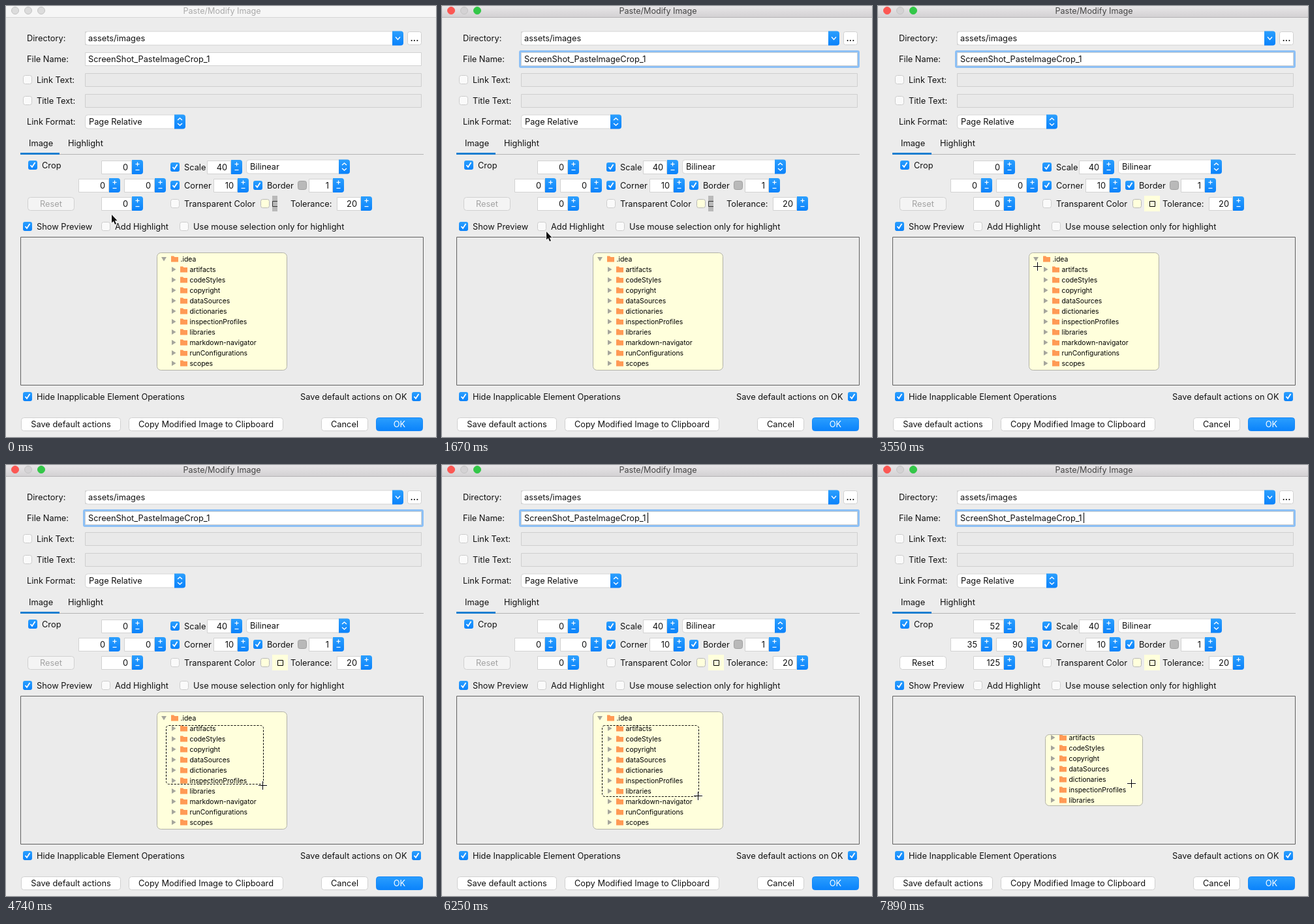
An HTML page with a canvas for the animation above (8 s loop, 659 by 661 pixels).

```html
<!DOCTYPE html>
<html lang="en">
<head>
<meta charset="utf-8">
<title>Paste/Modify Image</title>
<style>
html, body { margin: 0; width: 100%; height: 100%; overflow: hidden; background: #ececec; }
canvas { display: block; }
</style>
</head>
<body>
<canvas id="stage" width="659" height="661"></canvas>
<script>
const ctx = document.getElementById('stage').getContext('2d');
const LOOP = 8000, STEP = 117.76;
const UI = '12.8px Inter, sans-serif';
const SMALL = '10.4px Inter, sans-serif';
const FOLDERS = ['artifacts', 'codeStyles', 'copyright', 'dataSources', 'dictionaries',
  'inspectionProfiles', 'libraries', 'markdown-navigator', 'runConfigurations', 'scopes'];

// Pointer path: [step, x, y]
const PATH = [[0, 162, 320], [3, 89, 253], [4, 89, 253], [6, 88, 255], [11, 88, 255],
  [14, 160, 346], [18, 258, 411], [23, 244, 399], [33, 244, 399], [34, 252, 404],
  [37, 335, 453], [39, 393, 488], [40, 393, 491], [45, 392, 507], [62, 392, 507],
  [64, 394, 514], [66, 394, 514], [67, 388, 488]];

function pointerAt(step) {
  let i = PATH.findIndex(k => k[0] >= step);
  if (i < 0) i = PATH.length - 1;
  if (i === 0) return PATH[0].slice(1);
  const [a, ax, ay] = PATH[i - 1], [b, bx, by] = PATH[i];
  const u = Math.min(1, (step - a) / (b - a));
  return [Math.round(ax + (bx - ax) * u), Math.round(ay + (by - ay) * u)];
}

function rect(x, y, w, h, fill) {
  ctx.fillStyle = fill;
  ctx.fillRect(x, y, w, h);
}

function box(x, y, w, h, radius, fill, stroke) {
  ctx.beginPath();
  ctx.roundRect(x, y, w, h, radius);
  if (fill) { ctx.fillStyle = fill; ctx.fill(); }
  if (stroke) { ctx.strokeStyle = stroke; ctx.lineWidth = 1; ctx.stroke(); }
}

function poly(points, fill) {
  ctx.beginPath();
  points.forEach(([x, y]) => ctx.lineTo(x, y));
  ctx.closePath();
  ctx.fillStyle = fill;
  ctx.fill();
}

function line(points, color, width) {
  ctx.beginPath();
  points.forEach(([x, y], i) => i ? ctx.lineTo(x, y) : ctx.moveTo(x, y));
  ctx.strokeStyle = color;
  ctx.lineWidth = width;
  ctx.stroke();
}

// y is the middle of the capitals
function text(s, x, y, { color = '#111', align = 'left', font = UI } = {}) {
  ctx.font = font;
  ctx.fillStyle = color;
  ctx.textAlign = align;
  ctx.fillText(s, x, Math.round(y + (font === SMALL ? 4 : 4.6)));
}

function blue(y, h) {
  const g = ctx.createLinearGradient(0, y, 0, y + h);
  g.addColorStop(0, '#2b9ffe');
  g.addColorStop(1, '#0a82fb');
  return g;
}

function check(x, y, on, label) {
  if (on) {
    box(x, y - 7, 14, 14, 3, blue(y - 7, 14));
    line([[x + 3.5, y], [x + 6, y + 3], [x + 10.5, y - 4]], '#fff', 1.8);
  } else {
    box(x + .5, y - 6.5, 13, 13, 3, '#fafafa', '#cdcdcd');
  }
  if (label) text(label, x + 21, y);
}

function field(x, y, w, enabled = true) {
  box(x + .5, y + .5, w - 1, 20, 0, enabled ? '#fff' : '#e9e9e9', enabled ? '#d2d2d2' : '#cfcfcf');
}

function spinner(x, y, w, value) {
  field(x, y - 10, w);
  text(value, x + w - 6, y, { align: 'right' });
  const bx = x + w;
  box(bx, y - 11, 17, 22, [0, 4, 4, 0], blue(y - 11, 22));
  line([[bx + 5.5, y - 4.5], [bx + 11.5, y - 4.5]], '#fff', 1.2);
  line([[bx + 8.5, y - 7.5], [bx + 8.5, y - 1.5]], '#fff', 1.2);
  line([[bx + 5.5, y + 4.5], [bx + 11.5, y + 4.5]], '#fff', 1.2);
}

function combo(x, y, w, value, updown) {
  box(x + .5, y - 10.5, w - 1, 21, 4, '#fff', '#d4d4d4');
  text(value, x + 6, y - .5);
  const bx = x + w - 17, cx = bx + 8.5;
  box(bx, y - 11, 17, 22, [0, 4, 4, 0], blue(y - 11, 22));
  const chevron = (cy, d) => line([[cx - 3.5, cy - d], [cx, cy + d], [cx + 3.5, cy - d]], '#fff', 1.4);
  if (updown) { chevron(y - 4, -1.6); chevron(y + 4, 1.6); }
  else chevron(y, 2);
}

function button(x, y, w, label, { enabled = true, primary = false } = {}) {
  box(x + .5, y + .5, w - 1, 20, 4, primary ? blue(y, 21) : enabled ? '#fff' : '#f4f4f4', primary ? '#1688f8' : '#d0d0d0');
  text(label, x + w / 2, y + 10.5, { align: 'center', color: primary ? '#fff' : enabled ? '#111' : '#a3a3a3' });
}

function titleBar(active) {
  const g = ctx.createLinearGradient(0, 0, 0, 17);
  g.addColorStop(0, active ? '#e8e6e8' : '#f6f6f6');
  g.addColorStop(1, active ? '#d3d1d3' : '#f6f6f6');
  rect(0, 0, 659, 17, g);
  rect(0, 17, 659, 1, active ? '#b5b3b5' : '#d6d6d6');
  const lights = active ? ['#fc5753', '#d4d2d4', '#33c748'] : ['#dcdcdc', '#dcdcdc', '#dcdcdc'];
  lights.forEach((c, i) => box(8.5 + 20 * i, 1.5, 11, 11, 5.5, c, active && i !== 1 ? c : '#c4c4c4'));
  text('Paste/Modify Image', 331, 7, { align: 'center', color: active ? '#444' : '#a9a9a9', font: '12.6px Inter, sans-serif' });
}

function form(active, caret) {
  text('Directory:', 32, 49);
  field(121, 39, 470);
  combo(121, 49.5, 488, '', false);
  text('assets/images', 126, 49);
  box(615.5, 39.5, 21, 20, 3, '#fff', '#d0d0d0');
  text('...', 626, 49, { align: 'center', font: 'bold ' + UI });

  text('File Name:', 32, 81);
  if (active) box(118, 68, 522, 27, 3, '#8dc0f5');
  field(121, 71, 516);
  text('ScreenShot_PasteImageCrop_1', 126, 81);
  if (caret) rect(315, 73, 1, 16, '#000');

  check(26, 113, false, 'Link Text:');
  field(121, 103, 516, false);
  check(26, 145, false, 'Title Text:');
  field(121, 135, 516, false);
  text('Link Format:', 32, 177);
  combo(121, 177.5, 154, 'Page Relative', true);

  text('Image', 35, 210.5);
  text('Highlight', 95, 210.5);
  rect(22, 227, 618, 1, '#b4b4b4');
  rect(22, 225, 60, 3, '#1c7fd0');
}

function options(cropped, picking) {
  const [top, left, right, bottom] = cropped ? [52, 35, 90, 125] : [0, 0, 0, 0];
  check(34, 244, true, 'Crop');
  spinner(146, 247, 47, top);
  spinner(111, 275, 47, left);
  spinner(181, 275, 47, right);
  spinner(146, 303, 47, bottom);
  button(33, 293, 72, 'Reset', { enabled: cropped });

  check(252, 247, true, 'Scale');
  spinner(308, 247, 37, 40);
  combo(368, 246.5, 159, 'Bilinear', true);
  check(252, 275, true, 'Corner');
  spinner(318, 275, 37, 10);
  check(379, 275, true, 'Border');
  box(447.5, 268.5, 13, 13, 3, '#b9b9b9', '#a0a0a0');
  spinner(464, 275, 37, 1);

  check(252, 303, false, 'Transparent Color');
  box(390.5, 296.5, 13, 13, 3, '#ffffdc', '#b8b8b8');
  ctx.save();
  ctx.beginPath();
  ctx.rect(408, 291, picking ? 24 : 8, 24);
  ctx.clip();
  rect(408, 291, 24, 24, picking ? '#ffffdc' : '#b9b9b9');
  if (picking) box(416.5, 299.5, 8, 8, 0, null, '#000');
  else box(408.5, 299.5, 8, 8, 0, null, '#333');
  ctx.restore();
  text('Tolerance:', 436, 303);
  spinner(507, 303, 37, 20);

  check(26, 338, true, 'Show Preview');
  check(146, 338, false, 'Add Highlight');
  check(266, 338, false, 'Use mouse selection only for highlight');
}

function folder(x, y, name) {
  poly([[x, y - 4.5], [x + 4, y - 4.5], [x + 5.5, y - 3], [x + 11, y - 3], [x + 11, y + 4.5], [x, y + 4.5]], '#ff9a55');
  text(name, x + 14.5, y, { font: SMALL, color: '#000' });
}

function preview(cropped) {
  box(22.5, 354.5, 617, 227, 0, '#ebebeb', '#606060');
  const [x, y, w, h] = cropped ? [256.5, 413.5, 149, 109] : [231.5, 378.5, 199, 180];
  ctx.save();
  box(x, y, w, h, 6, '#ffffdc');
  ctx.clip();
  if (cropped) ctx.translate(11, 14);
  poly([[238, 385], [246, 385], [242, 391.5]], '#a5a59c');
  folder(253, 388, '.idea');
  FOLDERS.forEach((name, i) => {
    const cy = 404 + 16 * i;
    poly([[254, cy - 4], [260.5, cy], [254, cy + 4]], '#a5a59c');
    folder(267, cy, name);
  });
  ctx.restore();
  box(x, y, w, h, 6, null, '#b2b2a8');
}

function footer() {
  check(26, 599, true, 'Hide Inapplicable Element Operations');
  text('Save default actions on OK', 614.5, 599, { align: 'right' });
  check(622, 599, true);
  button(23, 631, 153, 'Save default actions');
  button(188, 631, 237, 'Copy Modified Image to Clipboard');
  button(483, 631, 72, 'Cancel');
  button(567, 631, 72, 'OK', { primary: true });
}

function selection(step) {
  const [x, y] = pointerAt(step - 1);
  if (x < 248) return;
  ctx.setLineDash([3, 2]);
  ctx.lineDashOffset = -step;
  box(245.5, 399.5, x + 1 - 245, y + 1 - 399, 4, null, '#000');
  ctx.setLineDash([]);
}

function pointer(x, y) {
  if (y > 354) {
    const bars = (r, width, color) => {
      line([[x - r, y + .5], [x + r + 1, y + .5]], color, width);
      line([[x + .5, y - r], [x + .5, y + r + 1]], color, width);
    };
    bars(7, 3, 'rgba(255,255,255,.5)');
    bars(6, 1, '#000');
    return;
  }
  const arrow = [[0, 0], [0, 12.5], [2.8, 10], [5, 15], [7, 14], [4.8, 9.2], [8.6, 9.2]]
    .map(([dx, dy]) => [x + dx, y + dy]);
  ctx.lineJoin = 'round';
  line([...arrow, arrow[0]], '#fff', 1.6);
  ctx.lineJoin = 'miter';
  poly(arrow, '#111');
}

function draw(t) {
  const step = Math.floor((t + 8) / STEP);
  const [x, y] = pointerAt(step);
  const active = step >= 9, cropped = step >= 55;
  const picking = step > 18 || (x > 231 && y > 378);
  const caret = active && (t - 3080 + 4 * 962) % 962 < 470;
  rect(0, 0, 659, 661, '#ececec');
  titleBar(active);
  form(active, caret);
  options(cropped, picking);
  preview(cropped);
  footer();
  if (step >= 34 && !cropped) selection(step);
  pointer(x, y);
}

function tick() {
  draw(performance.now() % LOOP);
  requestAnimationFrame(tick);
}
tick();
</script>
</body>
</html>
```
